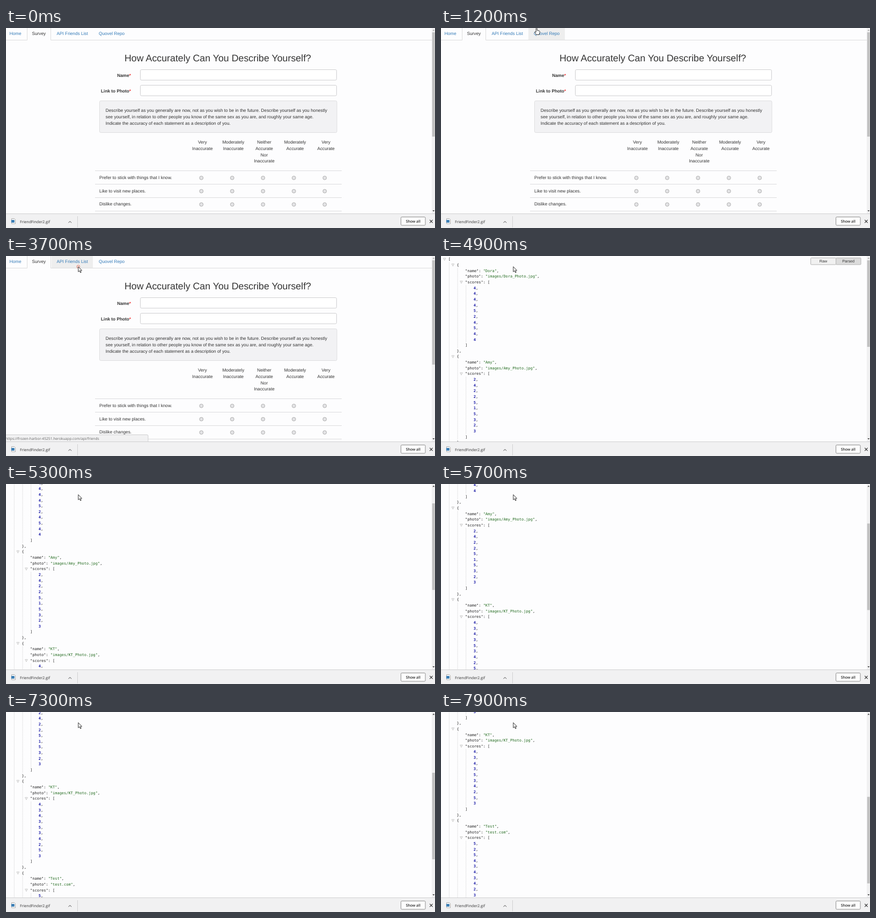
These frames come from a looping animation (800x372 px, 8000 ms). An HTML page:

```html
<!DOCTYPE html>
<html lang="en">
<head>
<meta charset="utf-8">
<title>Survey and friends list</title>
<style>
  html, body { margin: 0; width: 100%; height: 100%; overflow: hidden; background: #fdfdfe; }
  svg { display: block; width: 100vw; height: 100vh; }
  text { font: 8.26px "Liberation Sans", Arial, sans-serif; fill: #333; white-space: pre; text-rendering: geometricPrecision; }
  .link { fill: #337ab7; }
  .bold { font-weight: bold; }
  .title { font-size: 17.8px; }
  .mid { text-anchor: middle; }
  .end { text-anchor: end; }
  .small { font-size: 7.2px; }
  .ui { font: 7.1px "Open Sans", "Noto Sans", sans-serif; }
  .status { font-size: 6.7px; fill: #666; }
  .button { font-size: 6.8px; font-weight: 600; fill: #222; }
  .code { font: 6.98px "DejaVu Sans Mono", monospace; fill: #222; }
  .string { fill: #246c20; }
  .number { fill: #1a1aa6; font-weight: bold; }
</style>
</head>
<body>
<svg id="stage" viewBox="0 0 800 372" preserveAspectRatio="none"></svg>
<script>
const LOOP = 8000, STEP = 100;
const ROW = 10.65, INDENT = 15.65;
const PAGE_LOADED = 4000, CLICK = 3600;

const text = (x, y, content, cls = '') => `<text x="${x}" y="${y}" class="${cls}">${content}</text>`;
const box = (x, y, w, h, fill, stroke = 'none', r = 0, extra = '') =>
  `<rect x="${x}" y="${y}" width="${w}" height="${h}" fill="${fill}" stroke="${stroke}" rx="${r}" ${extra}/>`;
const path = (d, stroke, fill = 'none', width = 1) =>
  `<path d="${d}" stroke="${stroke}" fill="${fill}" stroke-width="${width}"/>`;
const group = (id, content) => `<g id="${id}">${content}</g>`;
const span = (cls, content) => `<tspan class="${cls}">${content}</tspan>`;

const tabs = [
  { id: 'apiTab', x: 85, w: 77, label: 'API Friends List', textX: 94.5 },
  { id: 'repoTab', x: 163, w: 68, label: 'Quovel Repo', textX: 173 },
];

function navigation() {
  return path('M0 22.5H39.5V-1M83.5 -1V22.5H794', '#ddd') +
    text(6.5, 13, 'Home', 'link') + text(48.5, 13, 'Survey') +
    tabs.map(t => box(t.x, 0, t.w, 22, '#eee', 'none', 0, `id="${t.id}"`) +
      text(t.textX, 13, t.label, 'link')).join('');
}

function field(label, y) {
  return text(233, y + 13.2, label + '<tspan fill="#e33">*</tspan>', 'bold end') +
    box(250.5, y, 366, 19.5, '#fff', '#cfcfd1', 2.3);
}

function surveyPage() {
  const intro = [
    'Describe yourself as you generally are now, not as you wish to be in the future. Describe yourself as you honestly',
    'see yourself, in relation to other people you know of the same sex as you are, and roughly your same age.',
    'Indicate the accuracy of each statement as a description of you.',
  ];
  const answers = ['Very Inaccurate', 'Moderately Inaccurate', 'Neither Accurate Nor Inaccurate',
    'Moderately Accurate', 'Very Accurate'];
  const statements = ['Prefer to stick with things that I know.', 'Like to visit new places.', 'Dislike changes.'];
  const radio = (x, y) =>
    `<circle cx="${x}" cy="${y}" r="3.4" fill="#e4e4e6" stroke="#a0a0a0" stroke-width=".8"/>`;

  return navigation() +
    text(395, 62, 'How Accurately Can You Describe Yourself?', 'title mid') +
    field('Name', 77.5) + field('Link to Photo', 106.5) +
    box(174.5, 135.5, 442.5, 59, '#f2f2f4', '#dedee0', 2.3) +
    intro.map((line, i) => text(185.8, 156.2 + i * 11.7, line)).join('') +
    answers.map((answer, col) => answer.split(' ').map((word, i) =>
      text(366.3 + col * 57.6, 215 + i * 11.75, word, 'mid')).join('')).join('') +
    path('M166 265.5H626M166 290.5H626M166 315.5H626M166 340.5H626', '#dcdcde') +
    statements.map((line, i) => text(174, 280.8 + i * 24.8, line) +
      answers.map((_, col) => radio(364.3 + col * 57.5, 278.8 + i * 24.7)).join('')).join('');
}

function jsonPage() {
  const friends = [
    ['Dora', 'images/Dora_Photo.jpg', '4444524544'],
    ['Amy', 'images/Amy_Photo.jpg', '2422515323'],
    ['KT', 'images/KT_Photo.jpg', '4343534253'],
    ['Test', 'test.com', '5254343423'],
  ];
  let out = '', row = 0;
  const rowY = n => 6 + n * ROW;
  const line = (depth, content) => {
    out += text(13.8 + depth * INDENT, rowY(row++) + 2.4, content, 'code');
  };
  const toggle = depth => {
    const x = 4.3 + depth * INDENT, y = rowY(row) - 2;
    out += path(`M${x} ${y}h4.6l-2.3 4.4z`, '#bbb', '#f4f4f4', .7);
  };
  const guide = (depth, rows) => {
    const x = 15.3 + depth * INDENT;
    out += `<path d="M${x} ${rowY(row) - 5}v${rows * ROW}" stroke="#c4c4c4" stroke-width=".7" stroke-dasharray="1 .8"/>`;
  };
  const pair = (key, value) => line(2, `"${key}": ` + span('string', `"${value}"`) + ',');

  toggle(0);
  line(0, '[');
  guide(0, friends.length * 16);
  for (const [name, photo, scores] of friends) {
    toggle(1);
    line(1, '{');
    guide(1, 14);
    pair('name', name);
    pair('photo', photo);
    toggle(2);
    line(2, '"scores": [');
    guide(2, 10);
    [...scores].forEach((n, i) => line(3, span('number', n) + (i < 9 ? ',' : '')));
    line(2, ']');
    line(1, '},');
  }
  return out +
    box(689.5, 3.5, 47, 12.5, '#f1f1f1', '#b4b4b4', 1) + box(736.5, 3.5, 46.5, 12.5, '#dcdcdc', '#b4b4b4', 1) +
    text(713, 12, 'Raw', 'small mid') + text(759.7, 12, 'Parsed', 'small mid');
}

function scrollbar() {
  return box(794, 0, 6, 346, '#f1f1f2') + box(794.7, 8, 5, 194, '#c1c1c1', 'none', 0, 'id="thumb"') +
    '<path id="upArrow" d="M795.3 5.2l2-2.4 2 2.4z"/>' + path('M795.3 339l2 2.4 2-2.4z', 'none', '#444');
}

function downloadBar() {
  return box(0, 345.5, 800, 27, '#f1f1f2') + path('M0 345.5H800', '#cfcfd1') +
    path('M10.5 354.5h5l2 2v7.5h-7z', '#999', '#fff', .8) + box(9.8, 357, 6, 5, '#3d7fb5') +
    text(26, 363.4, 'FriendFinder2.gif', 'ui') +
    path('M116.5 362.3l2.8-2.8 2.8 2.8', '#444') + path('M133.5 350V371', '#d0d0d2') +
    box(736.5, 351.5, 45.5, 15.5, '#fdfdfd', '#8f8f8f', 1.8) + text(759.3, 361.6, 'Show all', 'ui button mid') +
    path('M790.2 356.9l5.4 5.4m0-5.4l-5.4 5.4', '#333', 'none', 1.2);
}

function pointer() {
  const hand = 'M-1 8V1.2Q0 -.6 1 1.2V5l4 1.1Q6.4 6.6 6 8.6L5 13H-.6L-3.4 8.4Q-3.4 6.6 -1 8.4z';
  const arrow = 'M0 0V9.6L2.3 7.6 3.9 11.2 5.4 10.5 3.9 7.1H6.7z';
  return '<circle id="ring" r="2.8" fill="#fbe3dc" stroke="#d9786a" stroke-width=".9"/>' +
    group('hand', path(hand, '#222', '#fff', .9)) + group('arrow', path(arrow, '#222', '#fff', .9));
}

document.getElementById('stage').innerHTML =
  group('survey', surveyPage()) + group('json', jsonPage()) + scrollbar() +
  group('status', box(-1, 332.5, 266, 14, '#f1f1f2', '#cfcfd1', 2) +
    text(-1, 341.6, 'https://frozen-harbor-45251.herokuapp.com/api/friends', 'ui status')) +
  downloadBar() + group('pointer', pointer());

const el = id => document.getElementById(id);
const show = (id, visible) => el(id).setAttribute('visibility', visible ? 'visible' : 'hidden');
const clamp = v => Math.max(0, Math.min(1, v));

// Scroll offset between [time, offset] points
const scrollKeys = [[5000, 0], [5700, 142.5], [7300, 228.5], [7900, 326]];
function scrollAt(t) {
  let offset = 0;
  for (let i = 1; i < scrollKeys.length; i++) {
    const [t0, y0] = scrollKeys[i - 1], [t1, y1] = scrollKeys[i];
    offset += (y1 - y0) * clamp((t - t0) / (t1 - t0));
  }
  return offset;
}

function render(t) {
  const loaded = t >= PAGE_LOADED, offset = scrollAt(t);
  const left = (1 - clamp((t - 1100) / 900)) ** 2;
  const x = 134.8 + 55 * left, y = 19.8 - 26 * left;
  const pointing = t >= 1200;

  show('survey', !loaded);
  show('json', loaded);
  el('json').setAttribute('transform', `translate(0 ${-offset})`);
  el('thumb').setAttribute('y', 8 + offset * .4595);
  el('thumb').setAttribute('height', loaded ? 161 : 194);
  el('upArrow').setAttribute('fill', offset ? '#444' : '#aaa');

  for (const tab of tabs)
    show(tab.id, pointing && !loaded && x >= tab.x && x < tab.x + tab.w);
  show('status', pointing && !loaded && x < 162);

  el('pointer').setAttribute('transform', `translate(${x} ${y})`);
  show('hand', pointing && t < CLICK);
  show('arrow', t >= CLICK);
  show('ring', t >= CLICK && t < CLICK + 300);
}

function tick() {
  const t = performance.now() % LOOP;
  render(Math.floor(t / STEP) * STEP);
  requestAnimationFrame(tick);
}
tick();
</script>
</body>
</html>
```
